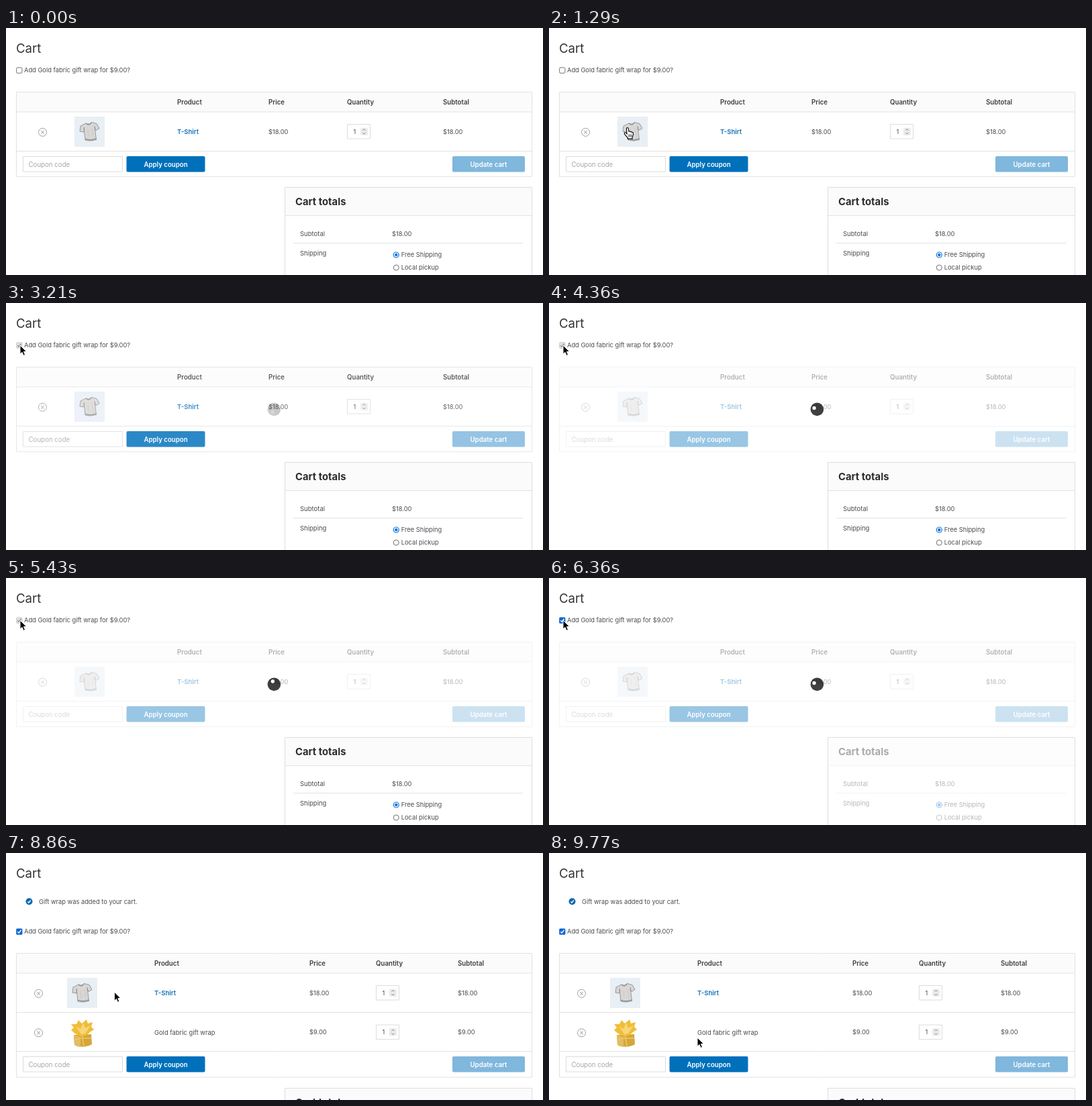
An HTML page with a canvas for the animation above (9.9 s loop, 800x368 px).

```html
<!DOCTYPE html>
<html lang="en">
<head>
<meta charset="utf-8">
<title>Cart</title>
<style>
html, body { margin: 0; width: 100%; height: 100%; overflow: hidden; background: #fff; }
canvas { display: block; width: 800px; height: 368px; }
</style>
</head>
<body>
<canvas id="stage"></canvas>
<script>
const W = 800, H = 368, LOOP = 9900, FPS = 14;
const FONT = 'Inter, Roboto, "Liberation Sans", sans-serif';
const INK = '#4a4c51', DARK = '#3b3d42', LINK = '#1572b6', BLUE = '#0070bb';
const LINE = '#e2e2e2', PALE = '#fbfbfb';

const canvas = document.getElementById('stage');
const dpr = window.devicePixelRatio || 1;
canvas.width = W * dpr;
canvas.height = H * dpr;
const ctx = canvas.getContext('2d');

// Steps at which the page changes state
const BLOCK = 43, ENABLE = 81, UPDATED = 117;

// Pointer path: step, x, y
const PATH = [
  [2, 570, 326], [3, 216, 111], [4, 326, 199], [5, 326, 199],
  [9, 258, 152], [10, 275, 156], [12, 275, 156], [18, 117, 148.5],
  [22, 117, 148.5], [25, 21, 63], [27, 101, 65], [28, 101, 65],
  [35, 178, 66], [36, 178, 66], [41, 21, 63], [121, 21, 63],
  [126, 255, 303], [128, 219, 276], [129, 219, 276], [133, 58, 268], [136, 221, 275]
];

const BEFORE = {
  label: 63, top: 96, totals: 237,
  cols: [255, 391, 508, 651], removeX: 54.5, thumbX: 102,
  rows: [{ name: 'T-Shirt', price: '$18.00', link: true, art: shirt }]
};
const AFTER = {
  label: 117, top: 150, totals: 350, notice: true,
  cols: [221, 452, 551, 673], removeX: 48.5, thumbX: 91,
  rows: [
    { name: 'T-Shirt', price: '$18.00', link: true, art: shirt },
    { name: 'Gold fabric gift wrap', price: '$9.00', art: giftBox }
  ]
};

const clamp = (v) => Math.max(0, Math.min(1, v));
const swing = (p) => (1 - Math.cos(Math.PI * clamp(p))) / 2;

function easeInOut(p) {
  let lo = 0, hi = 1;
  for (let i = 0; i < 18; i++) {
    const u = (lo + hi) / 2, v = 1 - u;
    const x = 1.26 * v * v * u + 1.74 * v * u * u + u * u * u;
    if (x < p) lo = u; else hi = u;
  }
  return lo * lo * (3 - 2 * lo);
}

function text(s, x, cy, size = 9.3, color = INK, weight = 400, align = 'left') {
  ctx.font = `${weight} ${size}px ${FONT}`;
  ctx.fillStyle = color;
  ctx.textAlign = align;
  ctx.fillText(s, x, cy + size * 0.364);
}

function rect(x, y, w, h, fill, stroke, r = 0) {
  ctx.beginPath();
  ctx.roundRect(x, y, w, h, r);
  if (fill) { ctx.fillStyle = fill; ctx.fill(); }
  if (stroke) { ctx.strokeStyle = stroke; ctx.lineWidth = 1; ctx.stroke(); }
}

function disc(x, y, r, fill, stroke, width = 1) {
  ctx.beginPath();
  ctx.arc(x, y, r, 0, Math.PI * 2);
  if (fill) { ctx.fillStyle = fill; ctx.fill(); }
  if (stroke) { ctx.strokeStyle = stroke; ctx.lineWidth = width; ctx.stroke(); }
}

function lines(points, color, width = 1) {
  ctx.beginPath();
  points.forEach(([x, y], i) => i ? ctx.lineTo(x, y) : ctx.moveTo(x, y));
  ctx.strokeStyle = color;
  ctx.lineWidth = width;
  ctx.stroke();
}

const rule = (x1, x2, y, color = LINE) => lines([[x1, y], [x2, y]], color);

function tick(x, y, color, s = 1) {
  lines([[x - 2.5 * s, y], [x - 0.7 * s, y + 2 * s], [x + 2.7 * s, y - 2.4 * s]], color, 1.4);
}

function button(label, x, y, w, color) {
  rect(x, y, w, 23.5, color, null, 2);
  text(label, x + w / 2, y + 12, 9.7, '#fff', 600, 'center');
}

function shape(d, fill, stroke, width = 0.7) {
  const p = new Path2D(d);
  if (fill) { ctx.fillStyle = fill; ctx.fill(p); }
  if (stroke) { ctx.strokeStyle = stroke; ctx.lineWidth = width; ctx.stroke(p); }
}

function at(x, y, draw) {
  ctx.save();
  ctx.translate(x, y);
  draw();
  ctx.restore();
}

function shirt() {
  rect(0, 0, 45, 45, '#e8eff5');
  shape('M17 10 L9 14 L8 22 L13.5 23 L14.5 21 L16 35 Q24 37.5 32.5 34.5 L30.5 18 L32 20.5 L37 17.5 L33 10.5 L25.5 8.5 Q22 12.5 17 10Z',
    '#d8d7d5', '#77777a');
  shape('M17 10 Q22 15 25.5 8.5 M14.5 21 L14 16 M30.5 18 L30 14.5 M16 33.5 Q24 36 32.3 33', null, '#68686b', 0.8);
  shape('M20 19 L21 30 M26 17 L28 30', null, '#c6c5c3', 0.8);
}

function giftBox() {
  shape('M10 26 L36 25 L37 40 Q24 47 11 41Z', '#d5a63a');
  shape('M10 26 L20 29 L20 44 Q15 44 11 41Z', '#e2bd62');
  shape('M20 28 L12 24 L6 19 L10 15 L6 10 L14 10 L17 4 L22 9 L29 3 L31 9 L38 7 L36 14 L40 18 L34 22 L28 27Z', '#f0bd38');
  shape('M21 25 L13 13 L20 17 L24 8 L27 16 L35 12 L27 24Z', '#f8d677');
  shape('M12 33 Q23 30 36 31 M22 26 L25 43', null, '#edc866', 1.5);
}

function removeIcon(x, y) {
  disc(x, y, 6, null, '#929397', 0.9);
  lines([[x - 2.3, y - 2.3], [x + 2.3, y + 2.3]], '#85868a', 0.9);
  lines([[x + 2.3, y - 2.3], [x - 2.3, y + 2.3]], '#85868a', 0.9);
}

function quantity(x, cy) {
  rect(x + 0.5, cy - 11, 34, 21.5, '#fff', '#dcdcdc');
  text('1', x + 9.5, cy);
  rect(x + 20, cy - 6, 11, 11.5, '#ebebeb', null, 2);
  const mx = x + 25.5;
  lines([[mx - 2, cy - 2], [mx, cy - 4], [mx + 2, cy - 2]], '#6f6f6f', 0.9);
  lines([[mx - 2, cy + 1.5], [mx, cy + 3.5], [mx + 2, cy + 1.5]], '#6f6f6f', 0.9);
}

function checkbox(y, state) {
  if (state === 'on') {
    rect(15.2, y - 4.5, 9.2, 9.2, '#0a67d2', null, 1.5);
    tick(19.8, y + 0.2, '#fff');
  } else if (state === 'busy') {
    rect(15.5, y - 4.2, 8.6, 8.6, '#e0e0e0', '#cfcfcf', 1.5);
    tick(19.8, y + 0.2, '#8c8c8c');
  } else {
    rect(15.7, y - 4, 8.2, 8.2, '#fff', '#707070', 1.3);
  }
}

function cartTable(p) {
  const { top, cols } = p;
  const foot = top + 29 + p.rows.length * 58.6;
  rect(15.5, top - 0.5, 768, foot + 38.5 - top, '#fff', LINE);
  rect(16, top, 767, 29, PALE);
  rule(16, 783, top + 29);
  ['Product', 'Price', 'Quantity', 'Subtotal'].forEach((s, i) =>
    text(s, cols[i], top + 14.5, 9.7, DARK, 600));
  p.rows.forEach((r, i) => {
    const y = top + 29 + i * 58.6, cy = y + 29.5;
    removeIcon(p.removeX, cy + 0.8);
    at(p.thumbX, Math.round(y + 7), r.art);
    text(r.name, cols[0], cy, r.link ? 9.6 : 9.4, r.link ? LINK : INK, r.link ? 600 : 400);
    text(r.price, cols[1], cy);
    quantity(cols[2], cy);
    text(r.price, cols[3], cy);
    rule(16, 783, Math.round(y + 58.6) - 0.5);
  });
  const fy = Math.round(foot) + 7;
  rect(25.5, fy + 0.5, 148, 22.5, '#fff', '#dcdcdc');
  text('Coupon code', 33.5, fy + 12, 9.7, '#a6a6a6');
  button('Apply coupon', 179.5, fy, 117, BLUE);
  button('Update cart', 665, fy, 108, '#80b7dd');
}

function totals(y, veil) {
  rect(416, y + 1, 367, 41, PALE);
  text('Cart totals', 431, y + 22, 14.8, '#2b2d30', 700);
  rule(416, 783, y + 42.5);
  text('Subtotal', 438, y + 70, 9.5);
  text('$18.00', 575, y + 70);
  rule(428, 770, y + 83.5);
  text('Shipping', 438, y + 98.5, 9.5);
  disc(581.3, y + 101, 4, '#fff', '#0a74e0', 1.2);
  disc(581.3, y + 101, 2.2, '#0a74e0');
  text('Free Shipping', 588.7, y + 101);
  disc(581.3, y + 120, 4, '#fff', '#707070');
  text('Local pickup', 588.7, y + 120);
  cover(416, y + 1, 367, H, veil);
  lines([[415.5, H + 5], [415.5, y + 0.5], [783.5, y + 0.5], [783.5, H + 5]], '#dedede');
}

function cover(x, y, w, h, veil) {
  ctx.fillStyle = `rgba(255,255,255,${0.6 * veil})`;
  ctx.fillRect(x, y, w, h);
}

function spinner(ms, veil) {
  const p = (ms / 1000 + 0.215) % 1;
  const a = (easeInOut(p) * 360 - 20) * Math.PI / 180;
  const x = 399.4, y = 158.4;
  ctx.globalAlpha = 0.75 * veil;
  disc(x, y, 9.8, '#000');
  ctx.globalAlpha = veil;
  disc(x + 4.8 * Math.cos(a), y + 4.8 * Math.sin(a), 2.7, '#fff');
  ctx.globalAlpha = 1;
}

function notice() {
  disc(34.5, 72.3, 5, '#0968b2');
  tick(34.5, 72.5, '#fff', 0.85);
  text('Gift wrap was added to your cart.', 49, 72.5);
}

function pointerAt(k) {
  const n = PATH.findIndex((q) => q[0] >= k);
  if (n < 0) return PATH[PATH.length - 1].slice(1);
  if (n === 0) return PATH[0].slice(1);
  const [k0, x0, y0] = PATH[n - 1], [k1, x1, y1] = PATH[n];
  const f = (k - k0) / (k1 - k0);
  return [x0 + (x1 - x0) * f, y0 + (y1 - y0) * f];
}

function arrow() {
  shape('M0 0 V13.2 L3 10.4 L5.1 15.3 L7.5 14.3 L5.4 9.5 H9.5Z', '#000', '#fff', 1);
}

function hand() {
  shape('M-1.6 1.5 Q-1.6 0 -.2 0 Q1.2 0 1.3 1.5 L1.9 5.7 Q3.6 4.7 4.3 6.2 Q5.8 5.4 6.5 7 Q8.4 6.5 8.5 8.6 Q8.8 12 7.1 14 V16.6 H.2 V14.8 Q-1.5 13.5 -4.4 9.6 Q-5.4 7.8 -4 7.3 Q-2.7 7 -1 9.2Z',
    '#fff', '#000', 1.1);
  shape('M2 10 V14 M4 10 V14 M6 10 V14', null, '#000', 0.8);
}

function pointer(k) {
  if (k < PATH[0][0]) return;
  const [x, y] = pointerAt(k);
  const onLink = x > 253 && x < 288 && y > 148 && y < 162;
  const onThumb = x > 102 && x < 147 && y > 132 && y < 177;
  at(x, y, k < BLOCK && (onLink || onThumb) ? hand : arrow);
}

function draw(t) {
  const k = Math.floor((t + 5) * FPS / 1000);
  const ms = k * 1000 / FPS;
  const fade = (start) => k < UPDATED ? swing((ms - start * 1000 / FPS) / 400) : 0;
  const page = k < UPDATED ? BEFORE : AFTER;
  const veil = fade(BLOCK);

  ctx.setTransform(dpr, 0, 0, dpr, 0, 0);
  ctx.fillStyle = '#fff';
  ctx.fillRect(0, 0, W, H);
  text('Cart', 15, 30, 18.6, '#303236');
  if (page.notice) notice();
  checkbox(page.label, k >= ENABLE ? 'on' : k >= BLOCK ? 'busy' : 'off');
  text('Add Gold fabric gift wrap for $9.00?', 27, page.label);
  cartTable(page);
  if (veil) {
    cover(15, 95, 769, 127, veil);
    spinner(ms, veil);
  }
  totals(page.totals, fade(ENABLE));
  pointer(k);
}

const begin = performance.now();
function frame() {
  draw((performance.now() - begin) % LOOP);
  requestAnimationFrame(frame);
}
frame();
</script>
</body>
</html>
```
